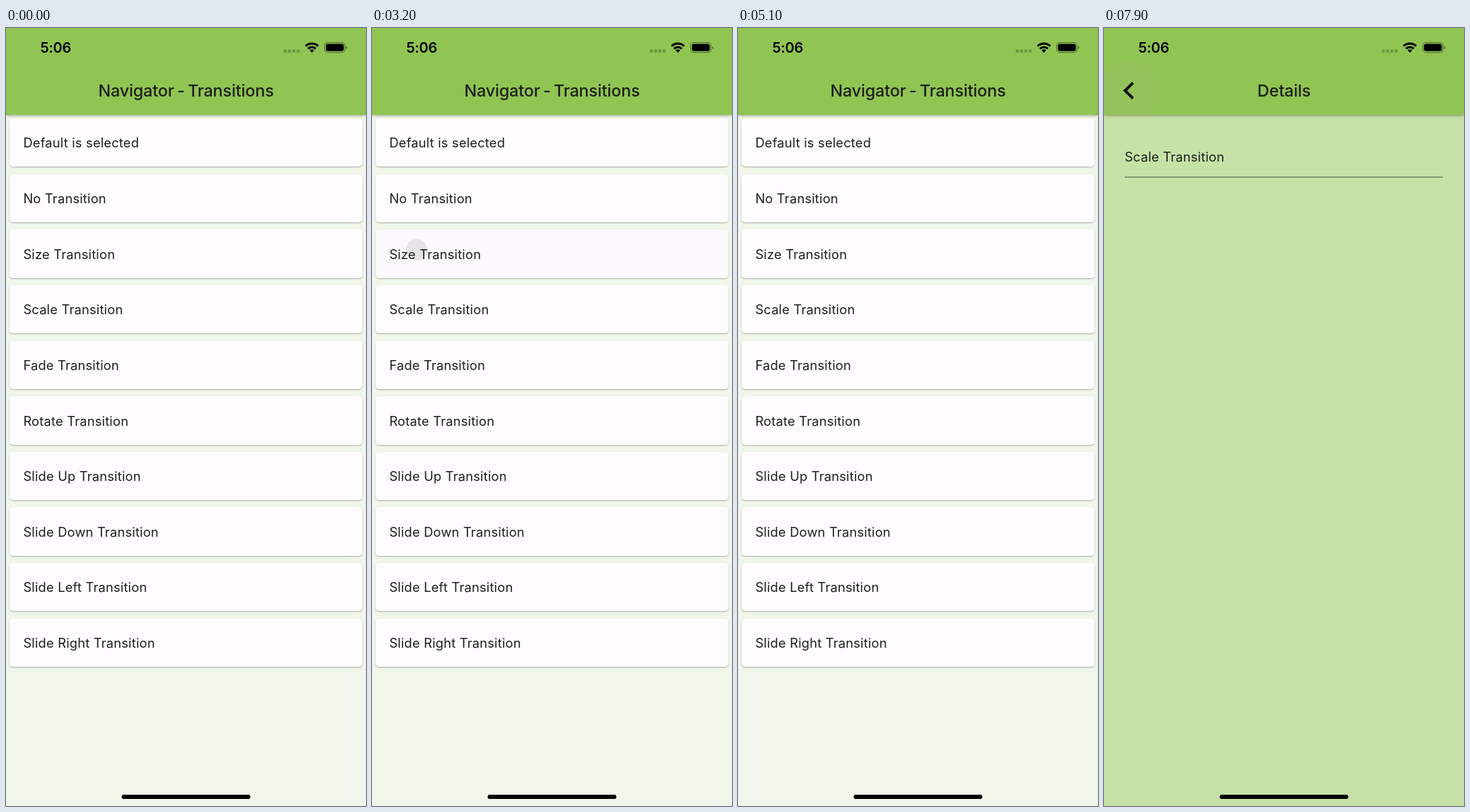
An HTML page for the animation above (8000 ms loop, 509x1101 px).

```html
<!DOCTYPE html>
<html lang="en">
<head>
<meta charset="utf-8">
<title>Navigator - Transitions</title>
<style>
  html, body { margin: 0; width: 100%; height: 100%; overflow: hidden; }
  body { position: relative; background: #f0f6e9; color: #1e1f1d; font-family: Inter, "Noto Sans", sans-serif; }

  .page { position: absolute; left: 0; top: 0; width: 509px; height: 1101px; overflow: hidden; background: #f0f6e9; }
  .details { background: #c6e2a8; }
  .page, .tap, .tap::after, .press { animation: 8s step-end infinite; }

  header {
    position: absolute; inset: 0 0 auto; height: 123px; overflow: hidden;
    background: #90c553;
  }
  .shade { position: absolute; inset: 0 0 auto; height: 123px; box-shadow: 0 1px 4px rgba(0, 0, 0, .36); }
  h1 {
    position: absolute; inset: 73.5px 0 auto; margin: 0; text-align: center;
    font-size: 23.4px; line-height: 30px; font-weight: 500; letter-spacing: -.15px; word-spacing: -1.8px;
  }
  header svg { position: absolute; left: 0; top: 0; }

  .card, .lift { position: absolute; left: 5px; width: 499px; height: 68.4px; border-radius: 5px; }
  .card { overflow: hidden; background: #fefcfe; }
  .lift { box-shadow: 0 1px 2px rgba(0, 0, 0, .3); }
  .label { position: absolute; white-space: nowrap; font-size: 18.3px; line-height: 24px; letter-spacing: .2px; }
  .card .label { left: 19.4px; top: 22.4px; }
  .details .label { left: 29.2px; top: 169.6px; }
  .rule { position: absolute; left: 29.4px; top: 210.3px; width: 450px; height: 1.5px; background: rgba(0, 0, 0, .31); }

  /* Touch feedback: --at is the moment of the touch in ms */
  .tap, .tap::after, .press { animation-delay: calc(var(--at) * 1ms - 8s); }
  .tap { position: absolute; inset: 0; background: rgba(0, 0, 0, .01); animation-name: fade; }
  .tap::after {
    content: ""; position: absolute; left: 43px; top: 14px; width: 30px; height: 30px;
    border-radius: 50%; background: rgba(0, 0, 0, .085); animation-name: splash;
  }
  .press {
    position: absolute; left: -9px; top: 44px; width: 88px; height: 88px; border-radius: 50%;
    background: rgba(160, 190, 125, .18); animation-name: blink;
  }
  @keyframes blink { 0% { opacity: 1 } 1.25%, 100% { opacity: 0 } }
  @keyframes fade { 0% { opacity: 1 } 3.75%, 100% { opacity: 0 } }
  @keyframes splash {
    0% { transform: scale(1); opacity: 1 }
    1.25% { transform: scale(6); opacity: .7 }
    2.5% { transform: scale(14); opacity: .4 }
    3.75%, 100% { transform: scale(1); opacity: 0 }
  }

  #list { animation-name: parallax; }
  @keyframes parallax {
    0% { transform: none }
    7.5% { transform: translateX(-18.3%) }
    8.75% { transform: translateX(-29.7%) }
    10% { transform: translateX(-32.5%) }
    11.25% { transform: translateX(-33.3%) }
    23.75% { transform: translateX(-15%) }
    25% { transform: translateX(-3.6%) }
    26.25% { transform: translateX(-.8%) }
    27.5%, 100% { transform: none }
  }
  .slide { animation-name: slide; }
  @keyframes slide {
    0% { transform: translateX(100%) }
    7.5% { transform: translateX(45%) }
    8.75% { transform: translateX(11%) }
    10% { transform: translateX(2.5%) }
    11.25% { transform: none }
    23.75% { transform: translateX(55%) }
    25% { transform: translateX(89%) }
    26.25% { transform: translateX(97.5%) }
    27.5%, 100% { transform: translateX(100%) }
  }
  .size { animation-name: size; }
  @keyframes size {
    0% { clip-path: inset(50% 0) }
    41.25% { clip-path: inset(45% 0) }
    42.5% { clip-path: inset(35% 0) }
    43.75% { clip-path: inset(25% 0) }
    45% { clip-path: inset(15% 0) }
    46.25% { clip-path: inset(5% 0) }
    47.5% { clip-path: inset(0) }
    57.5% { clip-path: inset(5% 0) }
    58.75% { clip-path: inset(15% 0) }
    60% { clip-path: inset(25% 0) }
    61.25% { clip-path: inset(35% 0) }
    62.5% { clip-path: inset(45% 0) }
    63.75%, 100% { clip-path: inset(50% 0) }
  }
  .scale { transform-origin: 100% 0; animation-name: grow; }
  @keyframes grow {
    0% { transform: scale(0) }
    81.25% { transform: scale(.1) }
    82.5% { transform: scale(.3) }
    83.75% { transform: scale(.5) }
    85% { transform: scale(.7) }
    86.25% { transform: scale(.9) }
    87.5%, 100% { transform: none }
  }

  #system { position: absolute; left: 0; top: 0; }
</style>
</head>
<body>
<div class="page" id="list"></div>

<svg id="system" width="509" height="1101">
  <text x="48.5" y="35" font-size="20" font-weight="600" letter-spacing="-.25">5:06</text>
  <g fill="#000" fill-opacity=".22">
    <rect x="392.5" y="30.3" width="4.6" height="4.6" rx="1.6"/>
    <rect x="398.6" y="30.3" width="4.6" height="4.6" rx="1.6"/>
    <rect x="404.7" y="30.3" width="4.6" height="4.6" rx="1.6"/>
    <rect x="410.8" y="30.3" width="4.6" height="4.6" rx="1.6"/>
  </g>
  <g fill="none" stroke="#000" stroke-width="3">
    <path d="M423.6 25.6a12.6 12.6 0 0 1 17.8 0"/>
    <path d="M427 29.2a7.8 7.8 0 0 1 11 0"/>
  </g>
  <path d="M429.3 31.6a4.6 4.6 0 0 1 6.4 0L432.5 35z"/>
  <rect x="450.6" y="20.6" width="28.8" height="14" rx="4.4" fill="none" stroke="#000" stroke-opacity=".4" stroke-width="1.2"/>
  <rect x="452.4" y="22.4" width="25.2" height="10.4" rx="2.8"/>
  <path d="M480.8 25.4q1.8.8 1.8 2.3t-1.8 2.3z" fill-opacity=".45"/>
  <rect x="163.5" y="1085" width="182" height="6" rx="3"/>
</svg>

<script>
  const items = ['Default is selected', 'No Transition',
    ...['Size', 'Scale', 'Fade', 'Rotate', 'Slide Up', 'Slide Down', 'Slide Left', 'Slide Right']
      .map(name => name + ' Transition')];

  // Each visit: list row, transition class, touch on the row, touch on the back button
  const visits = [
    { row: 0, kind: 'slide', open: 500, back: 1800 },
    { row: 2, kind: 'size', open: 3200, back: 4500 },
    { row: 3, kind: 'scale', open: 6400, back: 7900 },
  ];

  const label = text => `<div class="label">${text}</div>`;
  const header = (title, extra = '') =>
    `<div class="shade"></div><header>${extra}<h1>${title}</h1></header>`;

  const card = (text, row) => {
    const visit = visits.find(v => v.row === row);
    const tap = visit ? `<div class="tap" style="--at:${visit.open}"></div>` : '';
    const top = `top:${(127.9 + row * 78.65).toFixed(2)}px`;
    return `<div class="lift" style="${top}"></div><div class="card" style="${top}">${tap}${label(text)}</div>`;
  };

  const details = ({ row, kind, back }) => {
    const button = `<div class="press" style="--at:${back}"></div>
      <svg width="60" height="123"><path d="M41 77.6L29.8 88.6 41 99.6" fill="none" stroke="#0c0f08" stroke-width="4"/></svg>`;
    return `<div class="page details ${kind}">${header('Details', button)}${label(items[row])}<div class="rule"></div></div>`;
  };

  const list = document.getElementById('list');
  list.innerHTML = items.map(card).join('') + header('Navigator - Transitions');
  list.insertAdjacentHTML('afterend', visits.map(details).join(''));
</script>
</body>
</html>
```
